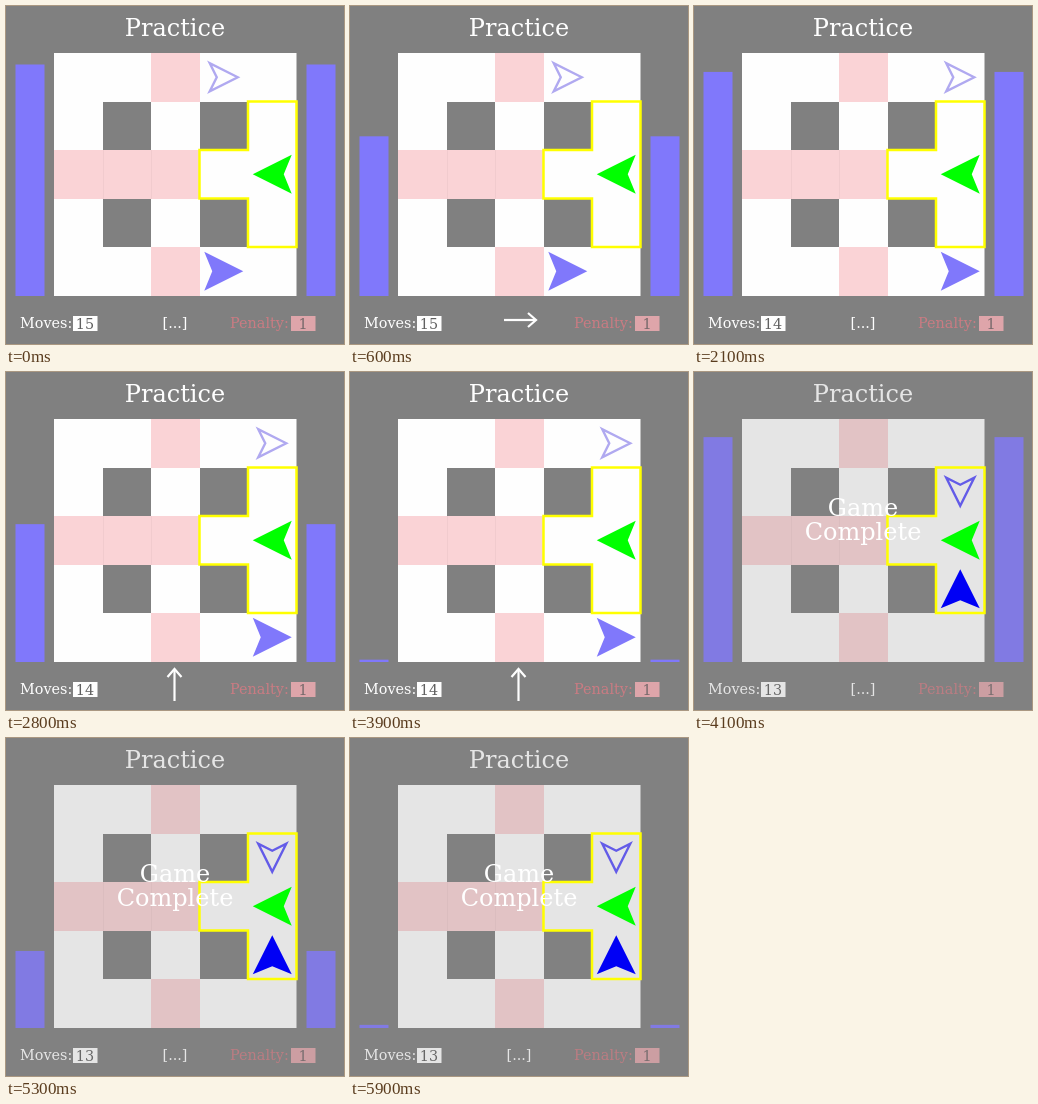
Write an HTML page with a canvas that moves like this. It is 338 by 338 pixels and loops after 6000 ms.

```html
<!DOCTYPE html>
<html lang="en">
<head>
<meta charset="utf-8">
<title>Practice</title>
<style>
html, body { margin: 0; width: 100%; height: 100%; overflow: hidden; background: #808080; }
canvas { display: block; width: 338px; height: 338px; }
</style>
</head>
<body>
<canvas id="stage"></canvas>
<script>
const SIZE = 338, LOOP = 6000, STEP = 100;
const LEFT = 48, TOP = 47, CELL = 48.5, BOTTOM = 290;
const GRAY = '#808080', WHITE = '#fefefe', PINK = '#fad3d6', VIOLET = '#8078fb';

const canvas = document.getElementById('stage');
const ctx = canvas.getContext('2d');
const ratio = window.devicePixelRatio || 1;
canvas.width = canvas.height = SIZE * ratio;
ctx.scale(ratio, ratio);

// Each round: start, time the chosen move appears, timer line, piece position.
const rounds = [
  { start: 0, choice: 400, top: 58.5, speed: 0.1197, moves: 15, col: 3, row: 4, angle: 0, mirror: 0 },
  { start: 2000, choice: 2500, top: 53.6, speed: 0.1232, moves: 14, col: 4, row: 4, angle: 0, mirror: 0 },
  { start: 4000, choice: Infinity, top: 52.8, speed: 0.1232, moves: 13, col: 4, row: 3, angle: -90, mirror: 90, done: true }
];

const cellX = col => LEFT + col * CELL;
const cellY = row => TOP + row * CELL;

function rect(x, y, w, h, color) {
  ctx.fillStyle = color;
  ctx.fillRect(x, y, w, h);
}

function cell(col, row, color) {
  const x = Math.round(cellX(col)), y = Math.round(cellY(row));
  rect(x, y, Math.round(cellX(col + 1)) - x, Math.round(cellY(row + 1)) - y, color);
}

function text(label, x, y, size, color, align = 'center') {
  ctx.font = `${size}px "DejaVu Serif", serif`;
  ctx.textAlign = align;
  ctx.fillStyle = color;
  ctx.fillText(label, x, y);
}

function trace(points) {
  ctx.beginPath();
  points.forEach(([x, y]) => ctx.lineTo(x, y));
}

function rotated(x, y, degrees, paint) {
  ctx.save();
  ctx.translate(x, y);
  ctx.rotate(degrees * Math.PI / 180);
  paint();
  ctx.restore();
}

function piece(col, row, angle, color, outline) {
  const r = outline ? 14 : 19.5, notch = outline ? -7 : -11.5;
  rotated(cellX(col + 0.5), cellY(row + 0.5), angle, () => {
    trace([[r, 0], [-r, -r], [notch, 0], [-r, r]]);
    ctx.closePath();
    if (outline) {
      ctx.strokeStyle = color;
      ctx.lineWidth = 2.4;
      ctx.stroke();
    } else {
      ctx.fillStyle = color;
      ctx.fill();
    }
  });
}

function moveArrow(x, y, angle) {
  rotated(x, y, angle, () => {
    ctx.strokeStyle = WHITE;
    ctx.lineWidth = 2.2;
    trace([[-16, 0], [15, 0]]);
    ctx.stroke();
    trace([[8, -7], [16, 0], [8, 7]]);
    ctx.stroke();
  });
}

function board() {
  rect(LEFT, TOP, 242.5, 243, WHITE);
  for (const col of [1, 3]) for (const row of [1, 3]) cell(col, row, GRAY);
  for (const [col, row] of [[2, 0], [0, 2], [1, 2], [2, 2], [2, 4]]) cell(col, row, PINK);
  for (const col of [1, 2]) rect(Math.round(cellX(col)), 144, 1, 49, '#f1cbce');
}

function goal() {
  const corners = [[4, 1], [5, 1], [5, 4], [4, 4], [4, 3], [3, 3], [3, 2], [4, 2]];
  trace(corners.map(([col, row]) => [cellX(col), cellY(row)]));
  ctx.closePath();
  ctx.strokeStyle = '#ffff00';
  ctx.lineWidth = 2.5;
  ctx.stroke();
}

function draw(t) {
  const round = rounds[Math.floor(t / 2000)];
  rect(0, 0, SIZE, SIZE, GRAY);
  text('Practice', 169, 30, 24, WHITE);
  board();

  const level = round.top + (t - round.start) * round.speed;
  const barTop = Math.min(288.5, Math.max(57, level));
  for (const x of [9.5, 300.5]) rect(x, barTop, 29, BOTTOM - barTop, VIOLET);

  text('Moves:', 14, 322, 14.4, WHITE, 'left');
  rect(67, 310, 24.5, 15, WHITE);
  text(round.moves, 79, 322.5, 14.4, '#606060');
  text('Penalty:', 224, 322, 14.4, '#c97b82', 'left');
  rect(285, 310, 24.5, 15, '#dea5aa');
  text('1', 297, 322.5, 14.4, '#75686a');

  if (t < round.choice) text('[...]', 169, 322, 14.4, WHITE);
  else if (round.moves === 15) moveArrow(170, 314, 0);
  else moveArrow(168.5, 313, -90);

  if (round.done) rect(0, 0, SIZE, SIZE, 'rgba(128, 128, 128, 0.2)');
  goal();
  piece(4, 2, 180, '#00ff00');
  piece(round.col, round.row, round.angle, round.done ? '#0000f5' : VIOLET);
  piece(round.col, 4 - round.row, round.mirror, round.done ? '#635be8' : '#b0a9f0', true);

  if (round.done) {
    text('Game', 169, 144, 24, '#ffffff');
    text('Complete', 169, 168, 24, '#ffffff');
  }
}

const origin = performance.now();
function tick() {
  const t = (performance.now() - origin) % LOOP;
  draw(Math.floor(t / STEP) * STEP);
  requestAnimationFrame(tick);
}
tick();
</script>
</body>
</html>
```
